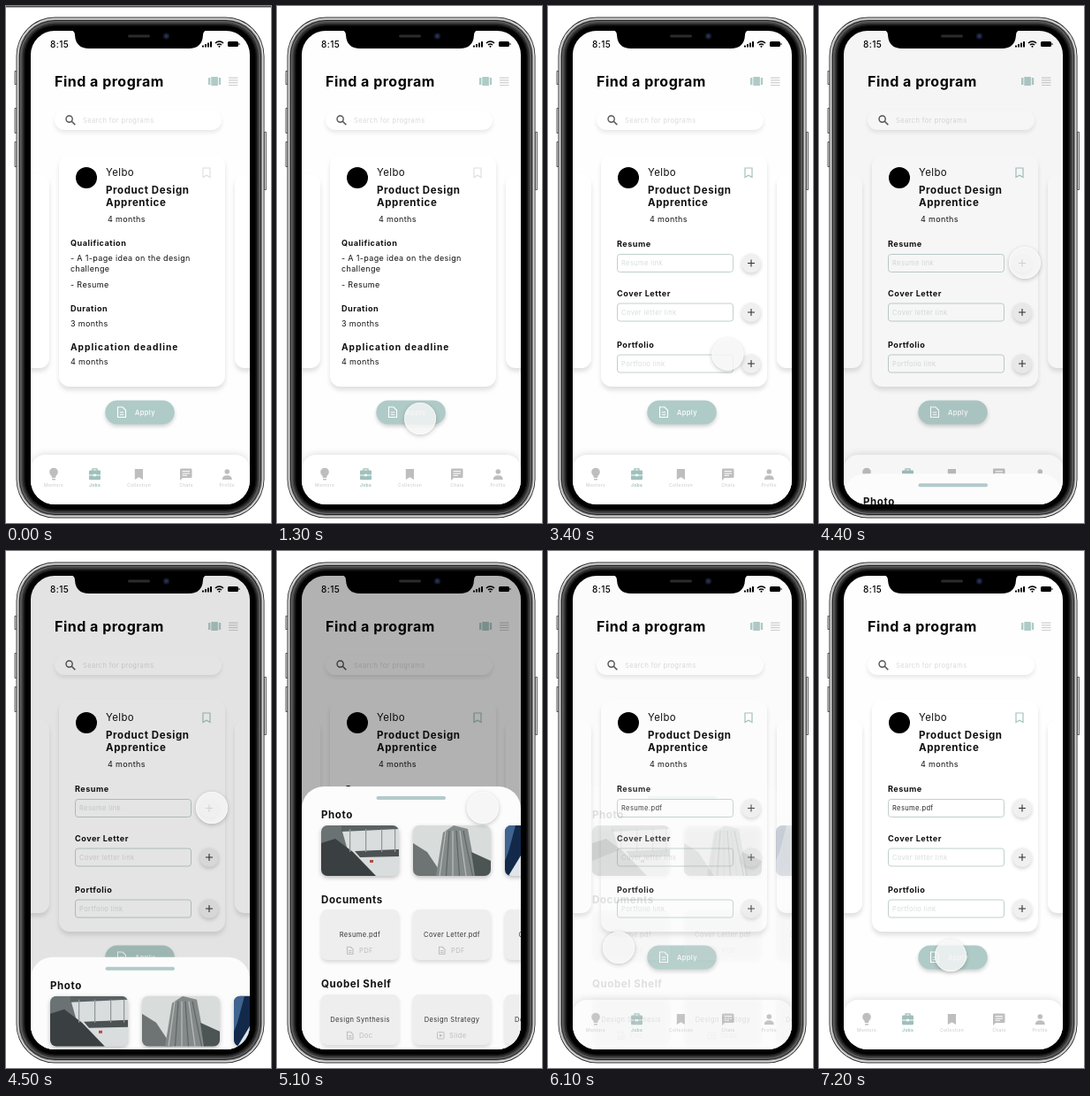
These frames come from a looping animation (300x584 px, 7.3 s). An HTML page with a canvas:

```html
<!DOCTYPE html>
<html lang="en">
<head>
<meta charset="utf-8">
<title>Find a program</title>
<style>
html, body { margin: 0; width: 100%; height: 100%; overflow: hidden; background: #fff; }
canvas { display: block; width: 300px; height: 584px; }
</style>
</head>
<body>
<canvas id="stage"></canvas>
<script>
const W = 300, H = 584, LOOP = 7300, STEP = 100;
const TEAL = '#afcbc7', INK = '#111', ICON = '#bebebe', JOBS = '#9fc0bc';
const canvas = document.getElementById('stage');
const ctx = canvas.getContext('2d');
const dpr = window.devicePixelRatio || 1;
canvas.width = W * dpr;
canvas.height = H * dpr;

const clamp = v => Math.max(0, Math.min(1, v));
const span = (t, a, b) => clamp((t - a) / (b - a));
const easeOut = (u, n = 2) => 1 - Math.pow(1 - u, n);
const easeInOut = u => u * u * (3 - 2 * u);

function shadow(alpha, blur, dy) {
  ctx.shadowColor = `rgba(0,0,0,${alpha})`;
  ctx.shadowBlur = blur * dpr;
  ctx.shadowOffsetY = dy * dpr;
}

function path(x, y, w, h, r) {
  ctx.beginPath();
  ctx.roundRect(x, y, w, h, r);
}

function box(x, y, w, h, r, fill, sh) {
  ctx.save();
  if (sh) shadow(...sh);
  ctx.fillStyle = fill;
  path(x, y, w, h, r);
  ctx.fill();
  ctx.restore();
}

function disc(x, y, r, fill, sh) {
  box(x - r, y - r, 2 * r, 2 * r, r, fill, sh);
}

function poly(points, fill) {
  ctx.fillStyle = fill;
  ctx.beginPath();
  points.forEach(([x, y]) => ctx.lineTo(x, y));
  ctx.closePath();
  ctx.fill();
}

function line(points, color, width = 1, close = false) {
  ctx.strokeStyle = color;
  ctx.lineWidth = width;
  ctx.beginPath();
  points.forEach(([x, y]) => ctx.lineTo(x, y));
  if (close) ctx.closePath();
  ctx.stroke();
}

function text(str, x, y, size, color = INK, weight = 400, gap = 0.35, align = 'left') {
  ctx.font = `${weight} ${size}px Inter, sans-serif`;
  ctx.letterSpacing = gap + 'px';
  ctx.textAlign = align;
  ctx.fillStyle = color;
  ctx.fillText(str, x, y);
}

const body = (str, x, y) => text(str, x, y, 9);
const label = (str, x, y) => text(str, x, y, 9.1, INK, 700, 0.5);
const heading = (str, x, y) => text(str, x, y, 11.5, INK, 700, 0.6);
const small = (str, x, y, color, align) => text(str, x, y, 7.5, color, 400, 0.4, align);

function faded(alpha, draw) {
  if (alpha <= 0) return;
  ctx.save();
  ctx.globalAlpha *= alpha;
  draw();
  ctx.restore();
}

function docIcon(x, y, w, h, color) {
  const c = w * 0.4;
  line([[x, y], [x + w - c, y], [x + w, y + c], [x + w, y + h], [x, y + h]], color, 1.1, true);
  line([[x + w * 0.25, y + h * 0.52], [x + w * 0.75, y + h * 0.52]], color);
  line([[x + w * 0.25, y + h * 0.76], [x + w * 0.75, y + h * 0.76]], color);
}

function bookmark(x, y, w, h) {
  return [[x, y], [x + w, y], [x + w, y + h], [x + w / 2, y + h * 0.78], [x, y + h]];
}

// Metal rim fading into the black bezel, as nested outlines.
const rim = [
  [0, '#2c2c2c'], [0.9, '#e2e2e2'], [2.2, '#a0a0a0'], [3.4, '#222'],
  [4.4, '#666'], [5.6, '#4a4a4a'], [7, '#2c2c2c'], [8.6, '#141414'], [10, '#000']
];

function drawBody() {
  [[9.5, 73, 16], [9.5, 115, 29], [9.5, 153, 29], [292, 142, 66]].forEach(([x, y, h]) => {
    box(x, y, 3, h, 1, '#555');
    box(x + 0.8, y + 0.8, 1.4, h - 1.6, 0.7, '#d8d8d8');
  });
  rim.forEach(([d, color]) => box(11.5 + d, 12.5 + d, 281 - 2 * d, 566 - 2 * d, 44 - d, color));
}

function drawStatus() {
  text('8:15', 50, 46.7, 10, '#000', 500, 0.4);
  for (let i = 0; i < 4; i++) box(222 + i * 3, 44.5 - i * 1.5, 2, 2 + i * 1.5, 0.5, '#000');
  ctx.strokeStyle = '#000';
  ctx.lineWidth = 1.5;
  [3.6, 6.4].forEach(r => {
    ctx.beginPath();
    ctx.arc(241.5, 46.5, r, Math.PI * 1.25, Math.PI * 1.75);
    ctx.stroke();
  });
  disc(241.5, 45.7, 1, '#000');
  box(251, 40, 12, 6, 1.5, '#000');
  box(263.5, 42, 1, 2, 0.5, '#000');
}

function drawNotch() {
  ctx.fillStyle = '#000';
  ctx.beginPath();
  ctx.moveTo(73, 27);
  ctx.quadraticCurveTo(78, 28, 78, 33);
  ctx.quadraticCurveTo(79, 48, 94, 48);
  ctx.lineTo(207, 48);
  ctx.quadraticCurveTo(222, 48, 223, 33);
  ctx.quadraticCurveTo(223, 28, 228, 27);
  ctx.fill();
  box(138, 32.5, 25, 3, 1.5, '#2b2b2b');
  disc(181.5, 34, 3.6, '#151a26');
  disc(181.5, 34, 1.7, '#27346b');
}

function drawHeader() {
  text('Find a program', 55, 91, 16, '#000', 700, 0.5);
  box(229, 81, 2.4, 8, 0.5, TEAL);
  box(232.3, 80, 7.6, 10, 0.5, TEAL);
  box(240.8, 81, 2.4, 8, 0.5, TEAL);
  for (let i = 0; i < 4; i++) box(252, 80.5 + i * 2.8, 10.5, 1.2, 0, '#cfcfcf');
  box(55, 118, 189, 22, 11, '#fff', [0.09, 5, 3]);
  ctx.strokeStyle = '#555';
  ctx.lineWidth = 1.4;
  ctx.beginPath();
  ctx.arc(71.6, 127.6, 3.6, 0, 7);
  ctx.stroke();
  line([[74.3, 130.3], [78.3, 134.3]], '#555', 1.6);
  small('Search for programs', 87, 131.7, '#dadada');
}

function drawDetails() {
  line(bookmark(223, 183, 8, 10.5), '#dedede', 1.1, true);
  label('Qualification', 73, 271);
  body('- A 1-page idea on the design', 73, 288);
  body('challenge', 73, 299.5);
  body('- Resume', 73, 318);
  label('Duration', 73, 345);
  body('3 months', 73, 361.5);
  text('Application deadline', 73, 388.5, 10.2, INK, 700, 1);
  body('4 months', 73, 405);
}

function drawForm(filled) {
  line(bookmark(223, 183, 8, 10.5), '#a3c3c0', 1.2, true);
  const rows = [['Resume', 'Resume link', 269], ['Cover Letter', 'Cover letter link', 324.5], ['Portfolio', 'Portfolio link', 382.5]];
  rows.forEach(([name, hint, y], i) => {
    label(name, 78, y + 3.2);
    ctx.strokeStyle = '#b9cbc9';
    ctx.lineWidth = 0.9;
    path(78.5, y + 11.5, 131, 20, 3);
    ctx.stroke();
    const done = filled && i === 0;
    small(done ? 'Resume.pdf' : hint, 83, y + 24.2, done ? '#222' : '#d6dddc');
    disc(230, y + 21.5, 10.8, '#f0f0f0', [0.18, 4, 2]);
    line([[226, y + 21.5], [234, y + 21.5]], '#333', 1.1);
    line([[230, y + 17.5], [230, y + 25.5]], '#333', 1.1);
  });
}

function drawCards(t) {
  const soft = [0.12, 5, 4];
  box(-20, 190, 69, 219, 11, '#fff', soft);
  box(259, 190, 80, 219, 11, '#fff', soft);
  box(60, 168, 188, 262, 12, '#fff', soft);
  disc(91, 194, 12, '#000');
  text('Yelbo', 113, 192, 11.4, INK, 400, 0.4);
  heading('Product Design', 113, 211.5);
  heading('Apprentice', 113, 225.5);
  body('4 months', 115, 244);
  const mix = span(t, 2300, 2500);
  faded(1 - mix, drawDetails);
  faded(mix, () => drawForm(t >= 5900));
}

function drawApply() {
  box(112.3, 445.5, 78.5, 27, 13.5, TEAL, [0.18, 4, 2.5]);
  docIcon(126.5, 453, 9, 11.5, '#fff');
  text('Apply', 146, 461.7, 7.5, '#fff', 500, 0.4);
}

function drawNav() {
  box(28, 507, 248, 70, 16, '#fff', [0.13, 8, -1]);
  disc(54, 526.5, 4.8, ICON);
  box(51.6, 529, 4.8, 4, 1, ICON);
  box(52, 534, 4, 1.5, 0.5, ICON);

  line([[98, 525], [98, 522.8], [103, 522.8], [103, 525]], JOBS, 1.3);
  box(94, 524.6, 13, 10.6, 1.2, JOBS);
  box(94, 529.4, 13, 1, 0, '#fff');
  box(99, 528.8, 3, 2.4, 0, '#fff');

  poly(bookmark(145.8, 523, 9.2, 12), ICON);

  box(197, 522.5, 13.5, 10.5, 1.2, ICON);
  poly([[197, 530], [197, 536], [200.5, 532.5]], ICON);
  [525, 527.4, 529.8].forEach((y, i) => box(199.5, y, i === 2 ? 5.5 : 8.5, 1, 0, '#fff'));

  disc(250.3, 526, 2.8, ICON);
  box(244.8, 530.2, 11, 4.8, [5, 5, 0, 0], ICON);

  [['Mentors', 54], ['Jobs', 100.5], ['Collection', 150.5], ['Chats', 204], ['Profile', 250.3]]
    .forEach(([name, x], i) => {
      const on = i === 1;
      text(name, x, 543, 5, on ? JOBS : '#cfcfcf', on ? 700 : 500, 0.3, 'center');
    });
}

function photo(x, y, base, paint) {
  box(x, y, 88, 57, 7, base, [0.25, 5, 2]);
  ctx.save();
  path(x, y, 88, 57, 7);
  ctx.clip();
  ctx.translate(x, y);
  paint();
  ctx.restore();
}

function bridge() {
  poly([[0, 0], [22, 0], [30, 28], [0, 40]], '#6b7273');
  poly([[22, 0], [88, 0], [88, 4], [23, 7]], '#5a6162');
  poly([[38, 29], [88, 27], [88, 35], [44, 36]], '#4c5253');
  poly([[0, 20], [16, 15], [36, 30], [62, 57], [0, 57]], '#3a4041');
  [32, 50, 68, 83].forEach(x => box(x, 4, 1.2, 26, 0, '#8f9697'));
  box(55, 39, 4, 3, 0, '#b54a43');
}

function tower() {
  poly([[0, 20], [16, 30], [34, 57], [0, 57]], '#6d7473');
  poly([[26, 57], [34, 8], [46, 0], [62, 4], [72, 57]], '#848a89');
  poly([[66, 30], [88, 40], [88, 57], [70, 57]], '#4d5454');
  for (let i = 0; i < 6; i++) line([[37 + i * 4, 6], [30 + i * 7.5, 57]], i % 2 ? '#5f6666' : '#b9bebd', 1.2);
}

function glass() {
  poly([[0, 0], [12, 0], [4, 30], [0, 40]], '#3f6490');
  poly([[4, 57], [18, 34], [18, 57]], '#dfe5ea');
}

function fileCard(x, y, name, kind) {
  box(x, y, 88, 57, 7, '#eeeeee', [0.14, 4, 2.5]);
  small(name, x + 44, y + 30.7, '#333', 'center');
  const slide = kind === 'Slide';
  if (slide) {
    ctx.strokeStyle = '#bdbdbd';
    ctx.lineWidth = 1;
    path(x + 27.5, y + 42.5, 7.5, 7.5, 1);
    ctx.stroke();
    poly([[x + 30, y + 44.3], [x + 33.3, y + 46.3], [x + 30, y + 48.3]], '#bdbdbd');
  } else {
    docIcon(x + 29.5, y + 42.3, 6.5, 8, '#bdbdbd');
  }
  small(kind, x + (slide ? 41 : 43), y + 49.2, '#bdbdbd');
}

function drawSheet(top) {
  const cols = [50, 154, 258];
  box(28, top, 248, 340, 25, '#fcfcfc');
  box(112.5, top + 11, 78.5, 4, 2, '#b3cacb');
  heading('Photo', 50, top + 36);
  photo(cols[0], top + 44, '#d9dddd', bridge);
  photo(cols[1], top + 44, '#d8dcda', tower);
  photo(cols[2], top + 44, '#12294a', glass);
  heading('Documents', 50, top + 131.5);
  ['Resume.pdf', 'Cover Letter.pdf', 'Certificate.pdf']
    .forEach((name, i) => fileCard(cols[i], top + 139, name, 'PDF'));
  heading('Quobel Shelf', 50, top + 227);
  [['Design Synthesis', 'Doc'], ['Design Strategy', 'Slide'], ['Design Research', 'Doc']]
    .forEach(([name, kind], i) => fileCard(cols[i], top + 235, name, kind));
}

function drawOverlay(t) {
  const rise = easeOut(span(t, 4355, 5100));
  const stay = Math.pow(1 - span(t, 5950, 6200), 2.3);
  if (!rise) return;
  ctx.fillStyle = `rgba(0,0,0,${0.3 * rise * Math.pow(stay, 1.5)})`;
  ctx.fillRect(28, 28, 248, 535);
  faded(stay, () => drawSheet(563 - 297 * rise));
}

// Pointer moves: start, end, easing, then start, control and end points.
const moves = [
  [330, 1100, easeOut, [330, 400], [235, 468], [162, 466]],
  [3310, 3900, u => easeOut(u, 3), [162, 466], [226, 369], [233, 294]],
  [4000, 4200, easeInOut, [233, 294], [233, 292], [233, 290]],
  [5120, 5900, easeInOut, [233, 290], [172, 395], [80, 448]],
  [6720, 7200, easeInOut, [80, 448], [114, 452], [149, 457]]
];

function pointerAt(t) {
  const move = moves.filter(m => t >= m[0]).pop();
  if (!move) return null;
  const [from, to, ease, a, b, c] = move;
  const s = ease(span(t, from, to));
  return [0, 1].map(k => (1 - s) * (1 - s) * a[k] + 2 * s * (1 - s) * b[k] + s * s * c[k]);
}

function drawPointer(t) {
  const p = pointerAt(t);
  if (!p) return;
  const [x, y] = p;
  // Keep the shadow outside, so it does not show through the disc.
  ctx.save();
  ctx.beginPath();
  ctx.rect(0, 0, W, H);
  ctx.arc(x, y, 18, 0, 2 * Math.PI);
  ctx.clip('evenodd');
  disc(x, y, 18, '#f4f4f4', [0.22, 5, 1.5]);
  ctx.restore();
  disc(x, y, 18, 'rgba(246,246,246,0.82)');
  ctx.strokeStyle = 'rgba(255,255,255,0.5)';
  ctx.lineWidth = 1;
  ctx.beginPath();
  ctx.arc(x, y, 17.5, 0, 2 * Math.PI);
  ctx.stroke();
}

function render(t) {
  ctx.setTransform(dpr, 0, 0, dpr, 0, 0);
  ctx.fillStyle = '#fff';
  ctx.fillRect(0, 0, W, H);
  drawBody();

  ctx.save();
  path(28, 28, 248, 535, 27);
  ctx.clip();
  ctx.fillStyle = '#fefefe';
  ctx.fillRect(28, 28, 248, 535);
  drawStatus();
  drawHeader();
  drawCards(t);
  drawApply();
  drawNav();
  drawOverlay(t);
  ctx.restore();

  drawNotch();
  drawPointer(t);
  faded(1 - span(t, 300, 1300), () => box(0, 0, W, 1.5, 0, '#4c4c4c'));
}

const start = performance.now();
function tick() {
  const t = (performance.now() - start) % LOOP;
  render(Math.floor(t / STEP) * STEP);
  requestAnimationFrame(tick);
}
tick();
</script>
</body>
</html>
```
